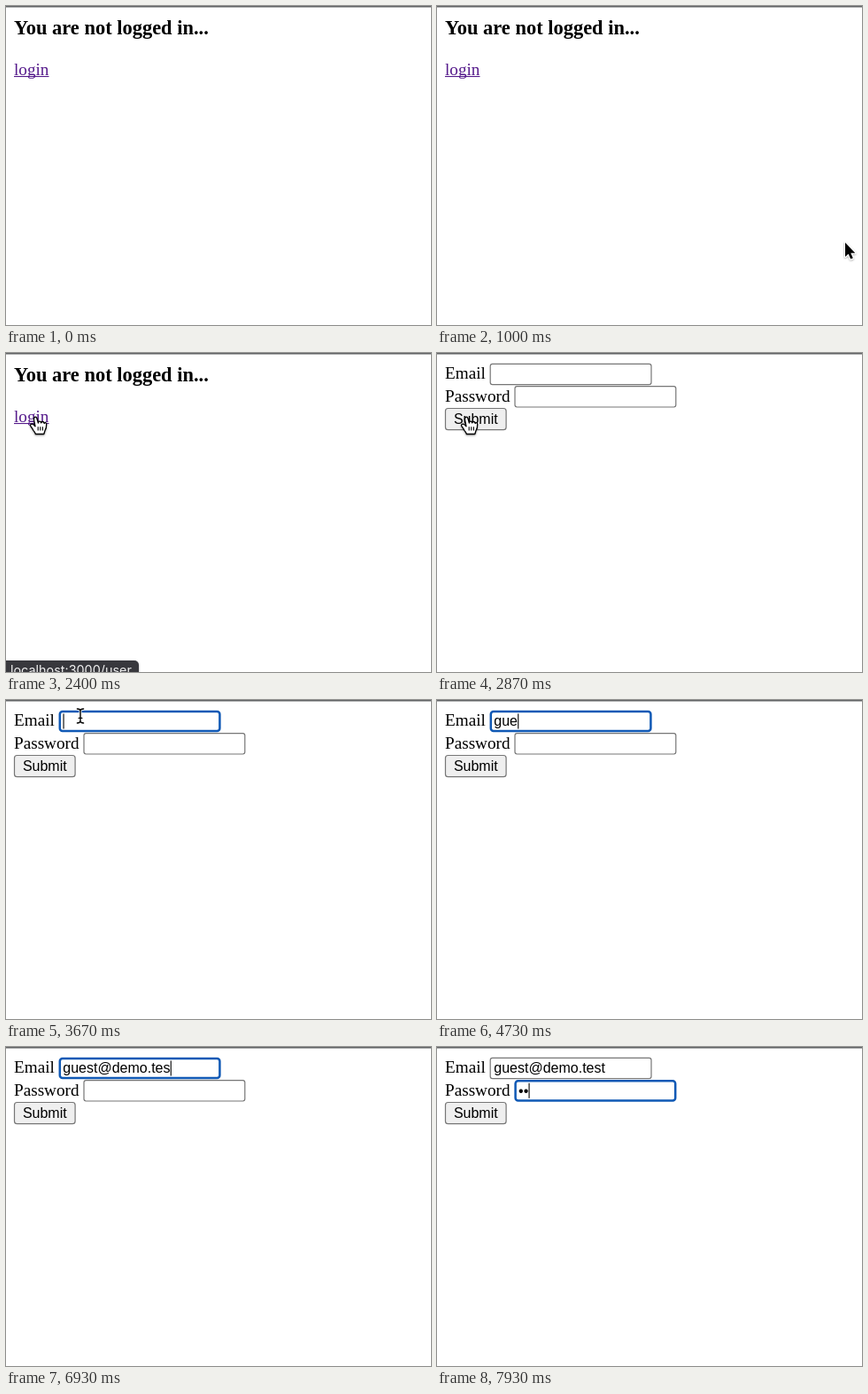
Recreate the animation shown at these times as an HTML page. Size 480 by 360 pixels, loop 8 s.

```html
<!DOCTYPE html>
<html lang="en">
<head>
<meta charset="utf-8">
<title>Login form</title>
<style>
  html, body { margin: 0; width: 100%; height: 100%; overflow: hidden; background: #fff; }
  svg { display: block; width: 100%; height: 100%; }
  text { font-kerning: none; }
  .serif { font: 19.2px "Liberation Serif", "Times New Roman", serif; }
  .head { font: bold 22.46px "Liberation Serif", "Times New Roman", serif; }
  .sans { font: 16px "Liberation Sans", Arial, sans-serif; }
  .tip { font: 14.4px Inter, Roboto, sans-serif; }
</style>
</head>
<body>
<svg viewBox="0 0 480 360">
  <defs>
    <filter id="soft" x="-50%" y="-50%" width="200%" height="200%">
      <feDropShadow dx="0" dy="1" stdDeviation="1" flood-opacity=".35"/>
    </filter>
  </defs>
  <rect width="480" height="360" fill="#fff"/>
  <rect width="480" height="1.5" fill="#626466"/>

  <g id="home">
    <text class="head" x="9" y="32">You are not logged in...</text>
    <text class="serif" x="9" y="77.5" fill="#551a8b">login</text>
    <rect x="9" y="79" width="39.5" height="1.1" fill="#551a8b"/>
  </g>

  <g id="form">
    <text class="serif" x="9" y="29.3">Email</text>
    <text class="serif" x="9" y="54.7">Password</text>
    <rect x="9.5" y="62.5" width="68.6" height="24.2" rx="3" fill="#efefef" stroke="#767676" stroke-width="1.2"/>
    <text class="sans" x="43.8" y="80" text-anchor="middle">Submit</text>
  </g>

  <g id="status">
    <rect x="-10" y="347" width="160" height="30" rx="5" fill="#38393d" filter="url(#soft)"/>
    <text class="tip" x="5" y="363.3" fill="#f1f1f1">localhost:3000/user</text>
  </g>

  <g id="arrow" filter="url(#soft)">
    <path d="M0 0V16L3.6 12.7 6.2 18.6 8.8 17.5 6.3 11.8H11.3Z" stroke="#fff" stroke-width="2"
      stroke-linejoin="round" paint-order="stroke"/>
  </g>
  <g id="hand" filter="url(#soft)">
    <path d="M-3 15.5C-4 13.4-5.4 11.7-6.3 10.3-7.2 8.6-4.6 7.3-2.9 8.9L-1 10.9-2.5 3C-2.9.2-.1-1 .9 1.8L2.4 7C2.3 4.6 5.3 4.2 5.7 6.9 6 4.9 8.8 5 9.2 7.5 9.8 6 11.8 6.3 11.7 8.6 11.8 11.7 11.2 14 9.8 16.2L8.8 19.5H-.6C-.9 18-2 17-3 15.5Z"
      fill="#fff" stroke="#000" stroke-width="1.3" stroke-linejoin="round"/>
    <path d="M2.2 11.3V15.6M4.8 11.3V15.6M7.4 11.3V15.6" stroke="#000" stroke-width="1.1"/>
  </g>
  <g id="beam" fill="none" stroke-linecap="round">
    <path class="bar" stroke="#fff" stroke-width="3"/>
    <path class="bar" stroke="#000" stroke-width="1.4"/>
  </g>
</svg>
<script>
const NS = "http://www.w3.org/2000/svg";
const LOOP = 8000;
const STEP = 200 / 3;
const $ = id => document.getElementById(id);
const show = (el, on) => el.setAttribute("visibility", on ? "visible" : "hidden");
const set = (el, attrs) => { for (const k in attrs) el.setAttribute(k, attrs[k]); };

document.querySelectorAll(".bar").forEach(bar =>
  bar.setAttribute("d", "M-3.6-8C-1.5-8 0-7.4 0-5.6V5.6C0 7.4-1.5 8-3.6 8M3.6-8C1.5-8 0-7.4 0-5.6M0 5.6C0 7.4 1.5 8 3.6 8M-1.8 2.4H1.8"));

function add(tag, attrs) {
  const el = document.createElementNS(NS, tag);
  set(el, attrs);
  $("form").append(el);
  return el;
}

function makeField(x, y) {
  const halo = add("rect", { x: x - .6, y: y - .6, width: 184.2, height: 25.8, rx: 4, fill: "#fff" });
  const box = add("rect", { fill: "#fff" });
  const label = add("text", { class: "sans", x: x + 4.7, y: y + 17.7 });
  const caret = add("rect", { y: y + 3.8, width: 1.1, height: 17 });
  return (value, focused, caretOn) => {
    show(halo, focused);
    const inset = focused ? 1.2 : .6;
    set(box, {
      x: x + inset, y: y + inset, width: 183 - 2 * inset, height: 24.6 - 2 * inset, rx: focused ? 3 : 2.4,
      stroke: focused ? "#1059b5" : "#767676", "stroke-width": focused ? 2.5 : 1.2
    });
    label.textContent = value;
    show(caret, caretOn);
    const width = value ? label.getComputedTextLength() : 0;
    caret.setAttribute("x", x + 4.9 + width);
  };
}

const email = makeField(59.6, 11.7);
const password = makeField(87.4, 37);

const ADDRESS = "guest@demo.test";
const KEYS = [4130, 4330, 4600, 4800, 5000, 5470, 5730, 5930, 6070, 6200, 6400, 6670, 6870, 6930, 7000];
const DOTS = [7800, 7930];
const typed = (times, t) => times.filter(k => k <= t).length;

const smooth = p => p * p * (3 - 2 * p);
const easeOut = p => 1 - (1 - p) ** 2;
const clamp = p => Math.min(1, Math.max(0, p));

// Each leg: start, end, target point, easing
const START = [433, 334];
const LEGS = [
  [870, 1000, [461, 267], p => p],
  [1200, 1670, [64, 88], smooth],
  [1670, 1930, [34, 72], easeOut],
  [2870, 3400, [84, 18], smooth]
];

function pointer(t) {
  let [x, y] = START;
  for (const [from, to, [tx, ty], ease] of LEGS) {
    const p = ease(clamp((t - from) / (to - from)));
    x += (tx - x) * p;
    y += (ty - y) * p;
  }
  return [x, y];
}

function pointerKind(t, x, y) {
  if (t < 870 || t >= 4070) return "";
  if (t <= 2870) return x < 49 && y < 83 ? "hand" : "arrow";
  return y < 62 ? "beam" : "arrow";
}

function draw(ms) {
  const t = Math.round(Math.floor((ms + 4) / STEP) * STEP / 10) * 10;
  const onForm = t >= 2530;
  $("home").style.display = onForm ? "none" : "";
  $("form").style.display = onForm ? "" : "none";

  if (onForm) {
    const second = t >= 7330;
    const first = t >= 3530 && !second;
    email(ADDRESS.slice(0, typed(KEYS, t)), first, first && t >= 3600);
    password("•".repeat(typed(DOTS, t)), second, second);
  }

  $("status").setAttribute("opacity", clamp((t - 2000) / 200) * clamp((2870 - t) / 200));

  const [x, y] = pointer(t);
  const kind = pointerKind(t, x, y);
  for (const id of ["arrow", "hand", "beam"]) {
    show($(id), id === kind);
    $(id).setAttribute("transform", `translate(${x} ${y})`);
  }
}

const begin = performance.now();
function tick() {
  draw((performance.now() - begin) % LOOP);
  requestAnimationFrame(tick);
}
tick();
</script>
</body>
</html>
```
